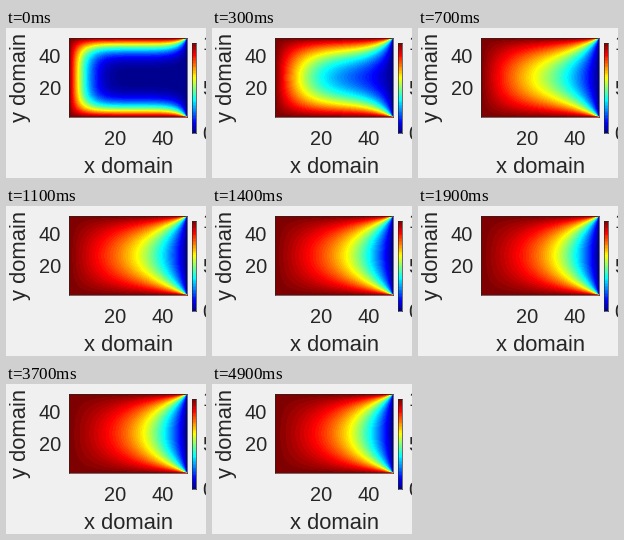
Animation, 200 px wide and 150 px high, one loop 5.3 s. Source, as a matplotlib script:

```python
import numpy as np
import matplotlib.pyplot as plt
from matplotlib.animation import FuncAnimation
from matplotlib.colors import ListedColormap

W, H, DPI = 200, 150, 100
N = 50                # grid points per side
SNAPSHOTS = 50
STEPS = 148           # solver steps between snapshots
R = 0.2               # diffusion number of one step
HOT = 1000
INK = "#262626"


def jet(levels=64):
    v = (np.arange(levels) + 1) / levels
    rgb = [np.clip(1.5 - abs(4 * v - c), 0, 1) for c in (3, 2, 1)]
    return ListedColormap(np.column_stack(rgb))


def diffuse():
    """Plate with three hot sides and a cold right side."""
    u = np.zeros((N, N))
    u[:, 0] = u[0] = u[-1] = HOT
    history = []
    for _ in range(SNAPSHOTS):
        for _ in range(STEPS):
            mid = u[1:-1, 1:-1]
            around = u[2:, 1:-1] + u[:-2, 1:-1] + u[1:-1, 2:] + u[1:-1, :-2]
            u[1:-1, 1:-1] = mid + R * (around - 4 * mid)
        history.append(u.copy())
    return history


def box(left, top, right, bottom):
    """Axes placed by pixel edges, with a thin dark outline and no ticks."""
    ax = fig.add_axes([left / W, 1 - bottom / H,
                       (right - left) / W, (bottom - top) / H])
    ax.set(xticks=[], yticks=[], facecolor="none")
    for spine in ax.spines.values():
        spine.set(linewidth=0.65 * 72 / DPI, edgecolor=INK)
    return ax


def write(x, y, text, size=20, **kw):
    fig.text(x / W, 1 - y / H, text, fontsize=size * 72 / DPI, color=INK,
             family="Liberation Sans", va="baseline", **kw)


fig = plt.figure(figsize=(W / DPI, H / DPI), dpi=DPI, facecolor="#f0f0f0")
cmap = jet()
history = diffuse()

left, top, right, bottom = 63, 10, 181, 89
plate = box(left, top, right, bottom)
heat = plate.imshow(history[0], cmap=cmap, vmin=0, vmax=HOT, origin="lower",
                    extent=(0.5, N + 0.5, 0.5, N + 0.5), aspect="auto",
                    interpolation="bilinear", interpolation_stage="data")
plate.set(xlim=(1, N), ylim=(1, N))

bar = box(186, 15, 190, 105)
bar.imshow(np.linspace(0, 1, 256)[:, None], cmap=cmap, origin="lower",
           aspect="auto", interpolation="nearest")

for tick in (20, 40):
    part = (tick - 1) / (N - 1)
    write(left + part * (right - left), 117, str(tick), ha="center")
    write(54.8, bottom - part * (bottom - top) + 8.5, str(tick), ha="right")
for i, value in enumerate((HOT, HOT // 2, 0)):
    write(196.3, 22 + 45 * i, str(value), ha="left")

write((left + right) / 2, 145, "x domain", 22, ha="center")
write(20.5, 50, "y domain", 22, ha="center",
      rotation=90, rotation_mode="anchor")


def update(i):
    heat.set_data(history[min(i, SNAPSHOTS - 1)])
    return [heat]


anim = FuncAnimation(fig, update, frames=53, interval=100,
                     repeat=True, repeat_delay=0)
plt.show()
```
